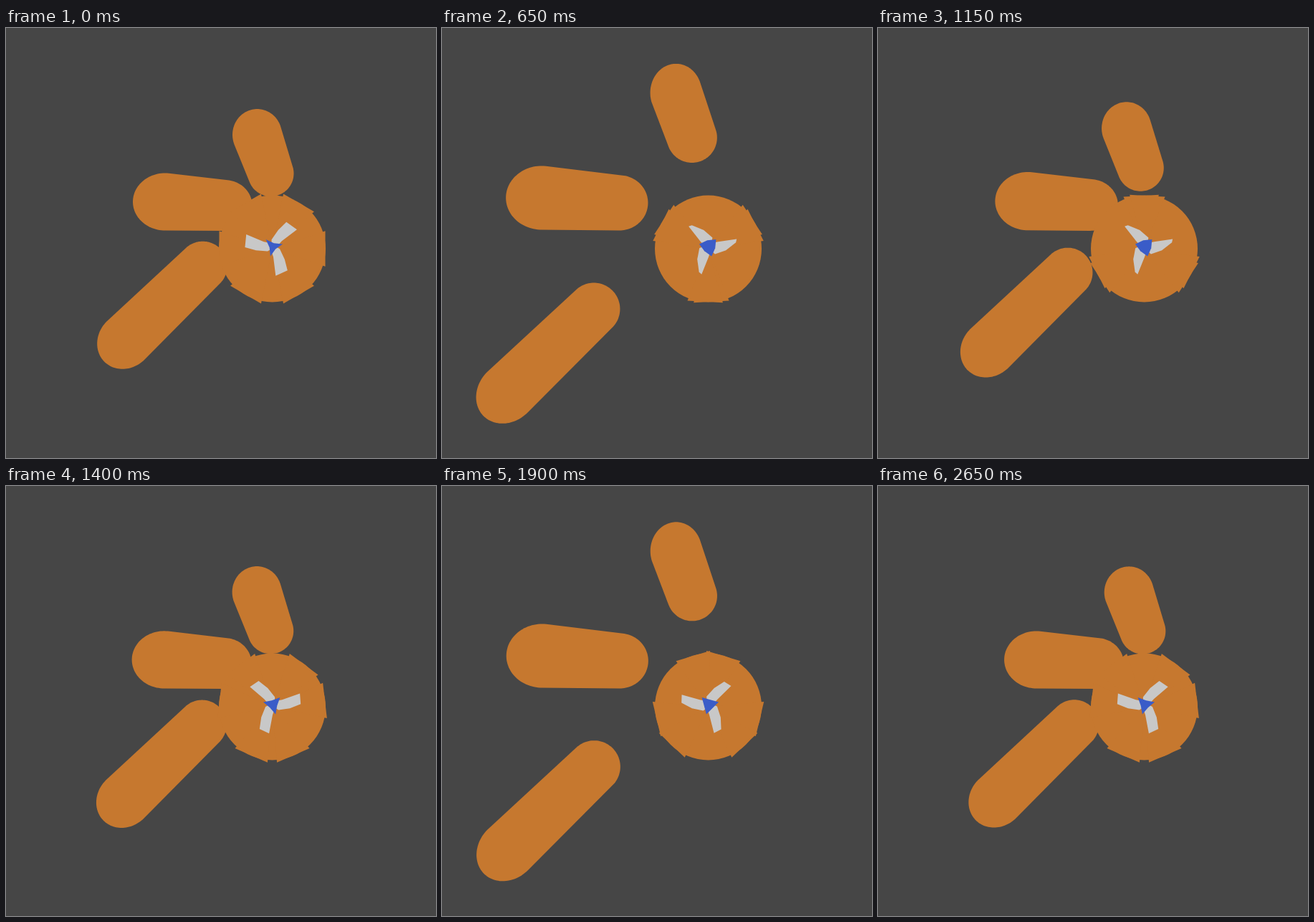
An HTML page with a canvas that plays this animation: 600 px wide and 600 px high, repeating every 2700 ms.

```html
<!DOCTYPE html>
<html lang="en">
<head>
<meta charset="utf-8">
<title>Hub and rods</title>
<style>
  html, body { margin: 0; width: 100%; height: 100%; overflow: hidden; background: #464646; }
  canvas { display: block; width: 600px; height: 600px; }
</style>
</head>
<body>
<canvas id="stage" width="600" height="600"></canvas>
<script>
const ctx = document.getElementById('stage').getContext('2d');
const BACK = '#464646', ORANGE = '#c6782f', LIGHT = '#c8c8c8', BLUE = '#3a5cc8';
const STEP = 50, STEPS = 54, PULSE = 27, PEAK = 12, TURN = 18;
const DEG = Math.PI / 180, THIRD = 120 * DEG;

// A rod is the hull of two end caps [x, y, rx, ry, tilt], given pulled in and pushed out.
const rods = [
  { near: [[350.5, 149, 34.5, 36, 0], [369.5, 203, 32, 32, 0]],
    far: [[326.8, 91, 36, 40.5, 0], [349, 153.5, 35, 35, 0]] },
  { near: [[222, 242.5, 45, 40, 0], [305, 247.5, 38.5, 35.5, 0]],
    far: [[140, 237, 50, 44.5, 0], [248, 244, 40, 38.5, 0]] },
  { near: [[167, 436, 42, 37.5, -45 * DEG], [274.5, 332, 34.3, 34.3, 0]],
    far: [[92, 507.5, 47, 40, -45 * DEG], [212.5, 391.5, 36.5, 36.5, 0]] }
];

const mix = (a, b, k) => a + (b - a) * k;
const polar = (r, angle) => [r * Math.cos(angle), -r * Math.sin(angle)];

function polygon(points, color) {
  ctx.beginPath();
  points.forEach(([x, y]) => ctx.lineTo(x, y));
  ctx.closePath();
  ctx.fillStyle = color;
  ctx.fill();
}

function at(x, y, draw) {
  ctx.save();
  ctx.translate(x, y);
  draw();
  ctx.restore();
}

// Outermost point of a tilted ellipse in the direction of an angle.
function support([x, y, rx, ry, tilt], angle) {
  const u = rx * Math.cos(angle - tilt), v = ry * Math.sin(angle - tilt);
  const size = Math.hypot(u, v);
  const dx = rx * u / size, dy = ry * v / size;
  return {
    point: [
      x + dx * Math.cos(tilt) - dy * Math.sin(tilt),
      y + dx * Math.sin(tilt) + dy * Math.cos(tilt)
    ],
    reach: size + x * Math.cos(angle) + y * Math.sin(angle)
  };
}

function drawRod(rod, push) {
  const caps = rod.near.map((cap, i) => cap.map((v, j) => mix(v, rod.far[i][j], push)));
  const outline = [];
  for (let angle = 0; angle < 360; angle += 3) {
    const [a, b] = caps.map(cap => support(cap, angle * DEG));
    outline.push(a.reach > b.reach ? a.point : b.point);
  }
  polygon(outline, ORANGE);
}

// Quick out, slower back, a little stronger close to the viewer.
function rodPush(step) {
  const s = step % PULSE;
  const k = s < PEAK ? s / PEAK : (PULSE - s) / (PULSE - PEAK);
  const wave = (1 - Math.cos(Math.PI * k)) / 2;
  return 1.022 * wave / (1 + 0.1 * (1 - wave));
}

// Two sets of three flat-ended bars turn against each other over a disc.
function drawRim(turn) {
  ctx.beginPath();
  ctx.arc(0, 0, 74.5, 0, 2 * Math.PI);
  ctx.fillStyle = ORANGE;
  ctx.fill();
  for (let i = 0; i < 3; i++) {
    for (const middle of [60 * DEG + turn, -turn]) {
      const angle = middle + i * THIRD, half = 18.5 * DEG;
      polygon([[0, 0], polar(78, angle - half), polar(78, angle + half)], ORANGE);
    }
  }
}

// The vanes narrow at the tip and thicken at the root, then flip to their mirror image.
function drawVanes(phase) {
  const flipped = phase >= TURN / 4 && phase < TURN * 3 / 4;
  const drift = flipped ? phase - TURN / 2 : (phase + TURN / 2) % TURN - TURN / 2;
  const spread = Math.abs(drift);
  const tip = 9 - 1.7 * spread, root = 8 + spread;
  if (flipped) ctx.scale(-1, 1);

  const star = [];
  for (let i = 0; i < 3; i++) {
    const axis = 48 * DEG + i * THIRD;
    ctx.save();
    ctx.rotate(-axis);
    polygon([[-3, 0], [5, 4], [14, 4], [40, tip], [38, -tip], [22, -10], [6, -root]], LIGHT);
    ctx.restore();
    star.push(polar(14, axis - 33 * DEG), polar(5 + spread, axis + 27 * DEG));
  }
  polygon(star, BLUE);
}

function frame(now) {
  const step = Math.floor(now / STEP) % STEPS;
  const phase = step % TURN;
  ctx.fillStyle = BACK;
  ctx.fillRect(0, 0, 600, 600);
  rods.forEach(rod => drawRod(rod, rodPush(step)));
  at(371.5, 308, () => drawRim(phase / TURN * THIRD));
  at(372.5, 305, () => drawVanes(phase));
}

const start = performance.now();
function loop() {
  frame(performance.now() - start);
  requestAnimationFrame(loop);
}
loop();
</script>
</body>
</html>
```
